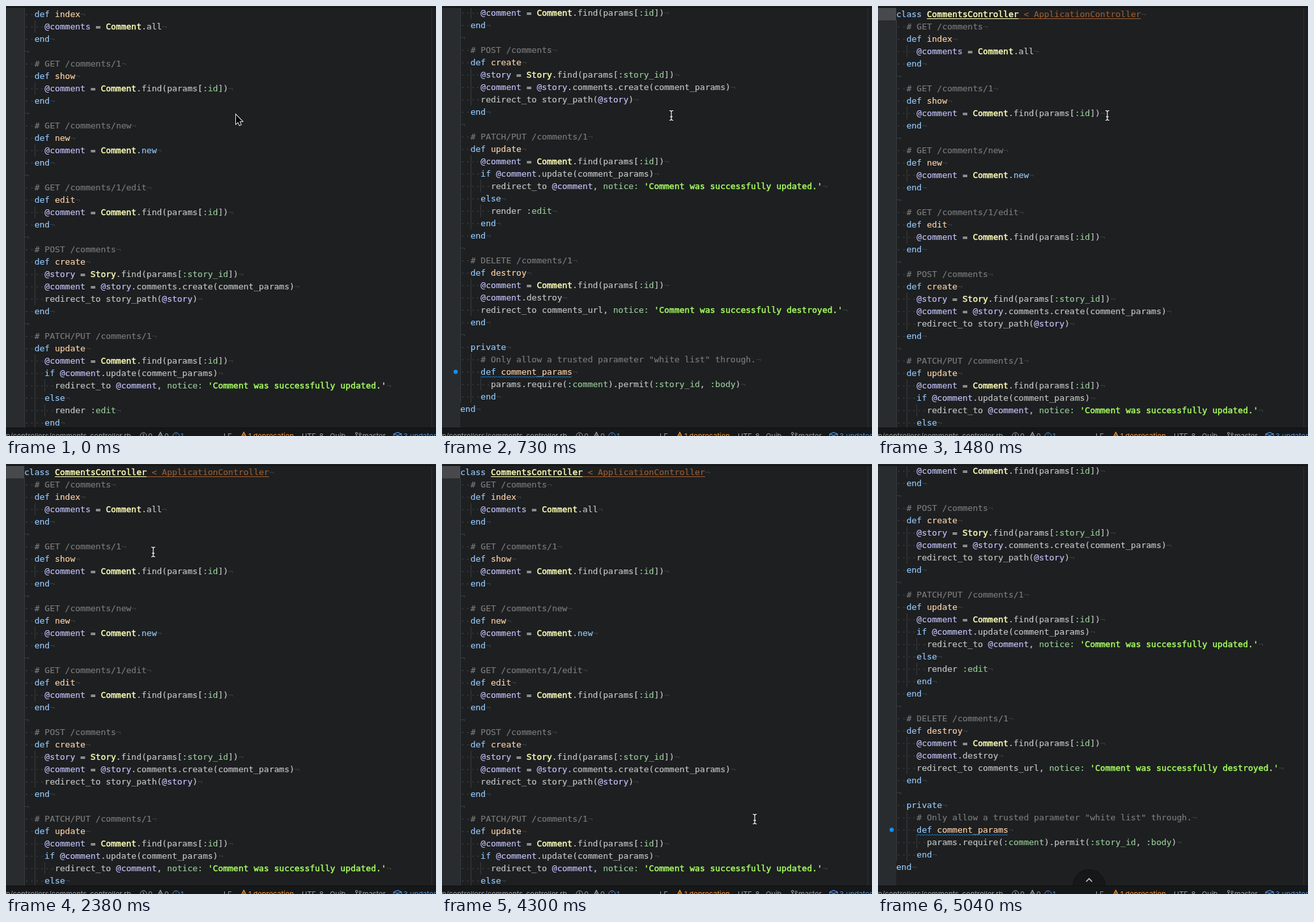
These frames come from a looping animation (660 px wide and 660 px high, 5.36 s). An HTML page with a canvas:

```html
<!DOCTYPE html>
<html lang="en">
<head>
<meta charset="utf-8">
<title>Editor scroll</title>
<style>
  html, body { margin: 0; width: 100%; height: 100%; overflow: hidden; background: #1d1f21; }
  canvas { display: block; width: 660px; height: 660px; }
</style>
</head>
<body>
<canvas id="stage" width="660" height="660"></canvas>
<script>
const ctx = document.getElementById('stage').getContext('2d');
const LOOP = 5360, SIZE = 660;
const LEFT = 28, TOP = 3, BOTTOM = 647, LINE = 19, CHAR = 7.826;
const CODE_FONT = '13px "DejaVu Sans Mono", monospace';
const UI_FONT = '11px Inter, sans-serif';

const COLOR = {
  bg: '#1d1f21', gutter: '#292c2f', activeGutter: '#47494c', faint: '#3c3f41',
  guide: '#383a3c', wrap: '#2d2f31', border: '#0f1011', panel: '#161719',
  text: '#c5c8c6', comment: '#7c7c7c', string: '#a8ff60', symbol: '#99cc99',
  variable: '#c6c5fe', keyword: '#96cbfe', name: '#ffd2a7', type: '#ffffb6',
  parent: '#9b5c2e', ui: '#9da0a3', blue: '#5293d8', orange: '#ff982d', info: '#1490f0'
};

const LINES = `class CommentsController < ApplicationController
  # GET /comments
  def index
    @comments = Comment.all
  end

  # GET /comments/1
  def show
    @comment = Comment.find(params[:id])
  end

  # GET /comments/new
  def new
    @comment = Comment.new
  end

  # GET /comments/1/edit
  def edit
    @comment = Comment.find(params[:id])
  end

  # POST /comments
  def create
    @story = Story.find(params[:story_id])
    @comment = @story.comments.create(comment_params)
    redirect_to story_path(@story)
  end

  # PATCH/PUT /comments/1
  def update
    @comment = Comment.find(params[:id])
    if @comment.update(comment_params)
      redirect_to @comment, notice: 'Comment was successfully updated.'
    else
      render :edit
    end
  end

  # DELETE /comments/1
  def destroy
    @comment = Comment.find(params[:id])
    @comment.destroy
    redirect_to comments_url, notice: 'Comment was successfully destroyed.'
  end

  private
    # Only allow a trusted parameter "white list" through.
    def comment_params
      params.require(:comment).permit(:story_id, :body)
    end
end`.split('\n');
const HINT_LINE = LINES.findIndex(line => line.includes('def comment_params'));

const TOKEN = new RegExp([
  '(?<comment>#.*)', "(?<string>'[^']*')", '(?<name>(?<=def )\\w+)', '(?<parent>< \\w+)',
  '(?<symbol>\\w+:|:\\w+)', '(?<variable>@\\w+)',
  '(?<keyword>\\b(?:class|def|end|private|if|else|new)\\b)', '(?<type>\\b[A-Z]\\w+)',
  '(?<text>\\w+|[^\\w\\s])'
].join('|'), 'g');

const TOKENS = LINES.map(line => [...line.matchAll(TOKEN)].map(match => ({
  col: match.index,
  text: match[0],
  kind: Object.keys(match.groups).find(key => match.groups[key])
})));

// Held states: [start time, value]
const SCROLL = [[0, 38], [590, 75], [730, 344], [1180, 225], [1330, 62], [1480, 0],
  [4310, 45], [4450, 183], [4590, 344]];
const POINTER = [[0, 'arrow', 353, 167], [590, 'beam', 352, 168], [1780, 'beam', 286, 150],
  [1930, 'beam', 226, 135], [2680, 'beam', 236, 152], [2830, 'beam', 279, 218],
  [2980, 'beam', 337, 302], [3120, 'beam', 390, 378], [3270, 'beam', 417, 414],
  [3570, 'beam', 428, 520], [3720, 'none'], [4160, 'beam', 480, 545],
  [4310, 'beam', 494, 446], [4590, 'beam', 500, 476], [4740, 'beam', 482, 560], [4890, 'none']];
const BUTTON = [[0, 0], [3720, 0.5], [3870, 1], [4160, 0], [4890, 0.6], [5040, 1]];
const CARET = [[0, false], [1930, true], [2380, false], [2830, true], [3120, false],
  [3570, true], [3870, false]];

const at = (track, time) => track.findLast(step => step[0] <= time).slice(1);

function rect(color, x, y, w, h) {
  ctx.fillStyle = color;
  ctx.fillRect(x, y, w, h);
}

function polyline(points, color, width, closed) {
  ctx.beginPath();
  points.forEach(([x, y]) => ctx.lineTo(x, y));
  if (closed) ctx.closePath();
  ctx.strokeStyle = color;
  ctx.lineWidth = width;
  ctx.stroke();
}

function circle(x, y, r, fill, stroke) {
  ctx.beginPath();
  ctx.arc(x, y, r, 0, Math.PI * 2);
  if (fill) { ctx.fillStyle = fill; ctx.fill(); }
  if (stroke) { ctx.strokeStyle = stroke; ctx.lineWidth = 1; ctx.stroke(); }
}

function codeText(text, x, y, color, weight) {
  ctx.fillStyle = ctx.strokeStyle = color;
  ctx.fillText(text, x, y);
  if (weight) {
    ctx.lineWidth = weight;
    ctx.strokeText(text, x, y);
  }
}

function drawLine(index, y) {
  const line = LINES[index], base = y + 14;
  const indent = line.search(/\S|$/);
  const guides = line ? indent : 2;
  for (let col = 0; col < guides; col += 2) {
    rect(COLOR.guide, Math.round(LEFT + col * CHAR), y, 1, LINE);
  }
  codeText('·'.repeat(indent), LEFT, base, COLOR.faint);
  for (const { col, text, kind } of TOKENS[index]) {
    const x = LEFT + col * CHAR;
    const strong = kind === 'type' || kind === 'string';
    codeText(text, x, base, COLOR[kind], strong ? 0.45 : 0.15);
    if (index === 0 && kind !== 'keyword') {
      const lead = kind === 'parent' ? CHAR : 0;
      rect(COLOR[kind], x - lead, base + 2, text.length * CHAR + lead, 1);
    }
  }
  codeText('¬', LEFT + line.length * CHAR, base, COLOR.faint);

  if (index === HINT_LINE) {
    circle(21, y + 9.5, 3.2, COLOR.info);
    const from = LEFT + indent * CHAR, to = LEFT + line.length * CHAR, wave = [];
    for (let x = from, i = 0; x <= to; x += 2, i++) wave.push([x, y + 16.5 + (i % 2) * 1.5]);
    polyline(wave, COLOR.info, 0.9);
  }
}

function drawEditor(scroll, caret) {
  ctx.save();
  ctx.beginPath();
  ctx.rect(0, TOP, SIZE, BOTTOM - TOP);
  ctx.clip();
  rect(COLOR.gutter, 0, TOP, LEFT, BOTTOM - TOP);
  rect(COLOR.activeGutter, 0, TOP - scroll, LEFT, LINE);
  rect(COLOR.wrap, 653, TOP, 1, BOTTOM - TOP);
  ctx.font = CODE_FONT;
  LINES.forEach((line, i) => {
    const y = TOP + i * LINE - scroll;
    if (y > -LINE && y < BOTTOM) drawLine(i, y);
  });
  if (caret) rect('#ffffff', LEFT, TOP - scroll, 1, LINE);
  ctx.restore();
}

function drawButton(rise) {
  if (!rise) return;
  ctx.save();
  ctx.beginPath();
  ctx.rect(0, 0, SIZE, BOTTOM);
  ctx.clip();
  const y = BOTTOM + (1 - rise) * 25;
  circle(324, y, 24.5, COLOR.panel, COLOR.border);
  polyline([[319.5, y - 6], [324, y - 10.5], [328.5, y - 6]], COLOR.text, 1.7);
  ctx.restore();
}

function label(text, x, color = COLOR.ui, align = 'left') {
  ctx.textAlign = align;
  ctx.fillStyle = color;
  ctx.fillText(text, x, 664);
  ctx.textAlign = 'left';
}

function warning(x, color) {
  polyline([[x, 664], [x + 5, 654.5], [x + 10, 664]], color, 1.4, true);
  rect(color, x + 4.4, 658, 1.2, 3);
}

function drawStatus() {
  rect(COLOR.panel, 0, BOTTOM, SIZE, 13);
  rect(COLOR.border, 0, BOTTOM, SIZE, 1);
  ctx.font = UI_FONT;
  label('p/controllers/comments_controller.rb', 192, COLOR.ui, 'right');
  circle(211, 660, 5, null, COLOR.ui);
  rect(COLOR.ui, 210.4, 657, 1.2, 3);
  label('0', 218);
  warning(232, COLOR.ui);
  label('0', 243);
  circle(261, 660, 5, null, COLOR.blue);
  rect(COLOR.blue, 260.4, 657, 1.2, 1.4);
  label('1', 268, COLOR.blue);
  label('LF', 334);
  warning(360, COLOR.orange);
  label('1 deprecation', 372, COLOR.orange);
  label('UTF-8', 454);
  label('Quib', 497);
  circle(538, 656, 1.6, null, COLOR.ui);
  circle(543.5, 657, 1.6, null, COLOR.ui);
  polyline([[538, 657.5], [538, 664]], COLOR.ui, 1.2);
  polyline([[543.5, 658.5], [542, 661], [538, 662]], COLOR.ui, 1.2);
  label('master', 547);
  polyline([[595, 657], [601, 654.5], [607, 657], [607, 664], [595, 664]], COLOR.blue, 1.2, true);
  polyline([[595, 657], [601, 659], [607, 657]], COLOR.blue, 1.2);
  polyline([[601, 659], [601, 664]], COLOR.blue, 1.2);
  label('3 updates', 610, COLOR.blue);
}

function drawPointer(shape, x, y) {
  if (shape === 'none') return;
  ctx.save();
  ctx.translate(x, y);
  if (shape === 'arrow') {
    const outline = [[0, 0], [0, 14], [3.2, 11], [5.4, 16], [7.6, 15], [5.5, 10.2], [9.8, 10]];
    polyline(outline, '#ffffff', 1.8, true);
    ctx.fillStyle = '#000000';
    ctx.fill();
  } else {
    for (const [color, width] of [['#111111', 2.6], ['#ffffff', 1.2]]) {
      polyline([[-3, -7.5], [-1, -7.2], [0, -6], [0, 6], [-1, 7.2], [-3, 7.5]], color, width);
      polyline([[3, -7.5], [1, -7.2], [0, -6]], color, width);
      polyline([[3, 7.5], [1, 7.2], [0, 6]], color, width);
      polyline([[-2, 2], [2, 2]], color, width);
    }
  }
  ctx.restore();
}

function draw(time) {
  rect(COLOR.bg, 0, 0, SIZE, SIZE);
  rect(COLOR.border, 0, 2, SIZE, 1);
  drawEditor(at(SCROLL, time)[0], at(CARET, time)[0]);
  drawButton(at(BUTTON, time)[0]);
  drawStatus();
  drawPointer(...at(POINTER, time));
}

const start = performance.now();
function tick() {
  draw((performance.now() - start) % LOOP);
  requestAnimationFrame(tick);
}
tick();
</script>
</body>
</html>
```
